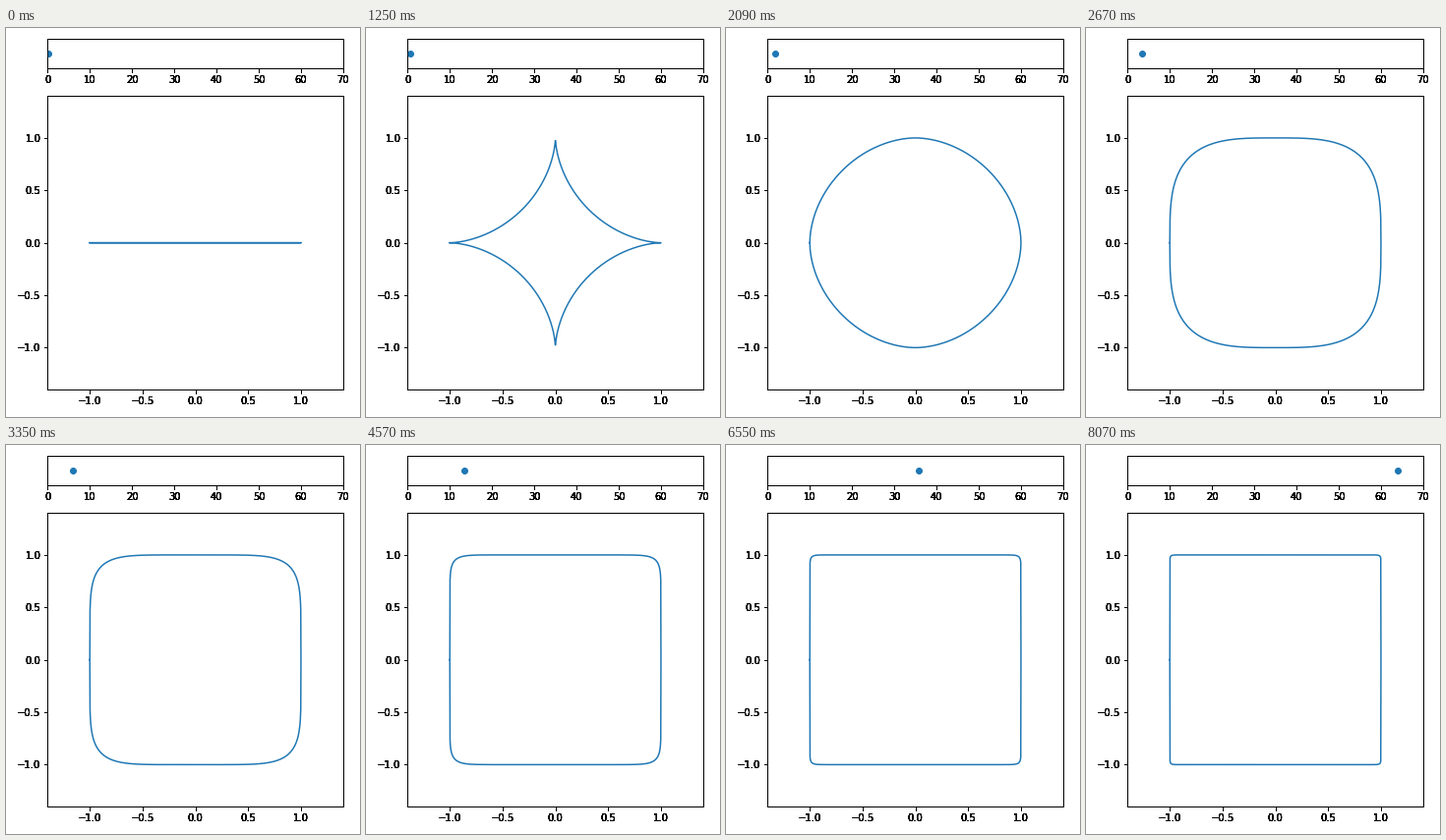
A matplotlib script that plays this animation: 360 px wide and 396 px high, repeating every 8090 ms.

```python
import numpy as np
import matplotlib.pyplot as plt
from matplotlib.animation import FuncAnimation

W, H, DPI = 360, 396, 72
LOOP_MS, TICK_MS = 8090, 10
HOLD_MS, STEP_MS = 450, 20
STEPS = (LOOP_MS - HOLD_MS) // STEP_MS
ROOT_START, ROOT_END = 0.465, 4.0   # cube roots of the first and last exponent
LEFT, RIGHT = 42.3, 342.9
BLUE = "#1f77b4"

plt.rcParams["font.family"] = "DejaVu Sans"
plt.rcParams["font.size"] = 10
fig = plt.figure(figsize=(W / DPI, H / DPI), dpi=DPI, facecolor="white")


def add_panel(top, bottom):
    """Axes placed by pixel rows counted from the top of the stage."""
    return fig.add_axes([LEFT / W, 1 - bottom / H,
                         (RIGHT - LEFT) / W, (bottom - top) / H])


gauge = add_panel(10.8, 40.7)
plot = add_panel(69.2, 368.1)

gauge.set(xlim=(0, 70), ylim=(-1, 1), xticks=range(0, 71, 10), yticks=[])
marks = np.linspace(-1, 1, 5)
plot.set(xlim=(-1.4, 1.4), ylim=(-1.4, 1.4), xticks=marks, yticks=marks)


def freeze_scales(overdraw=8):
    """Render ticks and labels once, inked several times over, as a backdrop."""
    fig.canvas.draw()
    layer = np.asarray(fig.canvas.buffer_rgba())[..., :3] / 255.0
    for ax in (gauge, plot):
        ax.set(xticks=[], yticks=[])
        ax.patch.set_visible(False)
    fig.figimage(layer ** overdraw, zorder=-1)


freeze_scales()

xs = np.linspace(-1, 1, 1000)
outline_x = np.concatenate([xs, xs[::-1]])
outline, = plot.plot([], [], color=BLUE, lw=1.5)
dot, = gauge.plot([], [], "o", color=BLUE, ms=6)


def exponent(ms):
    step = 0 if ms < HOLD_MS else (ms - HOLD_MS) // STEP_MS + 1
    return (ROOT_START + (ROOT_END - ROOT_START) * step / STEPS) ** 3


def update(frame):
    p = exponent(frame * TICK_MS)
    ys = np.clip(1 - np.abs(xs) ** p, 0, 1) ** (1 / p)
    outline.set_data(outline_x, np.concatenate([ys, -ys[::-1]]))
    dot.set_data([p], [0])
    return outline, dot


anim = FuncAnimation(fig, update, frames=LOOP_MS // TICK_MS,
                     interval=TICK_MS, repeat=True, repeat_delay=0)
plt.show()
```
